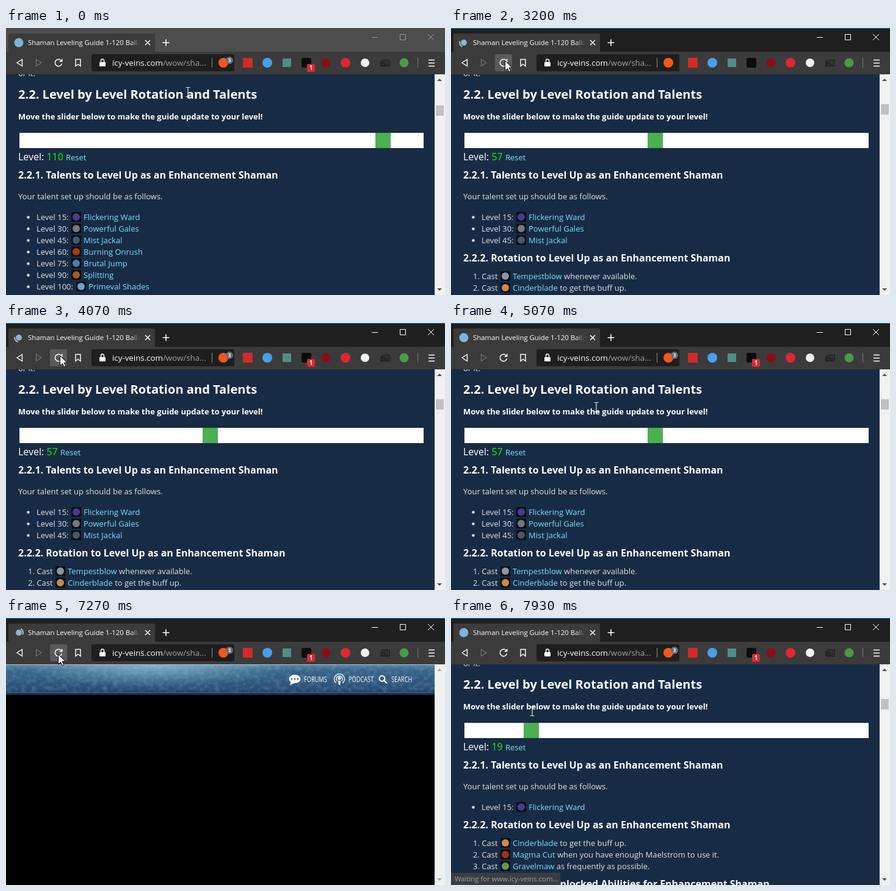
Animation, 719 px wide and 438 px high, one loop 8000 ms. Source, as an HTML page:

```html
<!DOCTYPE html>
<html lang="en">
<head>
<meta charset="utf-8">
<title>Leveling guide</title>
<style>
html, body { margin: 0; width: 100%; height: 100%; overflow: hidden; background: #182b44; }
svg { display: block; width: 719px; height: 438px; }
text { font-family: "Open Sans", "Noto Sans", sans-serif; fill: #e0e3e7; }
.bold { font-weight: 700; }
.white { fill: #fff; }
.link { fill: #76e2ff; }
.lime { fill: #0f0; }
.title { fill: #fff; font-weight: 700; stroke: #fff; stroke-width: .8px; }
.news { fill: #d3281f; font-weight: 700; }
.grey { fill: #a2a2a2; }
</style>
</head>
<body>
<svg id="stage" viewBox="0 0 719 438">
  <defs>
    <linearGradient id="sky" x2="0" y2="1">
      <stop offset="0" stop-color="#5886a6"/><stop offset=".2" stop-color="#38658a"/>
      <stop offset=".8" stop-color="#2a4f77"/><stop offset="1" stop-color="#1c3557"/>
    </linearGradient>
    <radialGradient id="glow"><stop offset="0" stop-color="#8fc0d6" stop-opacity=".75"/><stop offset="1" stop-color="#8fc0d6" stop-opacity="0"/></radialGradient>
    <linearGradient id="fade"><stop offset="0" stop-color="#3b3b3b" stop-opacity="0"/><stop offset="1" stop-color="#3b3b3b"/></linearGradient>
    <filter id="grain" x="0" y="0" width="1" height="1">
      <feTurbulence type="fractalNoise" baseFrequency=".12 .16" numOctaves="4" seed="4"/>
      <feColorMatrix values="0 0 0 0 .5  0 0 0 0 .7  0 0 0 0 .82  2 0 0 0 -.8"/>
    </filter>
    <clipPath id="view"><path d="M0 76H719V438H0z"/></clipPath>
  </defs>
  <g id="page" clip-path="url(#view)"></g>
  <g id="chrome"></g>
  <g id="cursor"></g>
</svg>
<script>
const LOOP = 8000, FPS = 15;
const CONDENSED = .7;

const text = (x, y, size, s, cls = '') => `<text x="${x}" y="${y}" font-size="${size}" class="${cls}">${s}</text>`;
const narrow = (x, y, size, s, cls) =>
  `<text transform="translate(${x} ${y}) scale(${CONDENSED} 1)" font-size="${size}" class="${cls}">${s}</text>`;
const span = (s, cls, size = '') => `<tspan class="${cls}"${size && ` font-size="${size}"`}>${s}</tspan>`;
const link = (s, size) => span(s, 'link', size);
const rect = (x, y, w, h, fill, rx = 0) => `<rect x="${x}" y="${y}" width="${w}" height="${h}" fill="${fill}" rx="${rx}"/>`;
const disc = (x, y, r, fill) => `<circle cx="${x}" cy="${y}" r="${r}" fill="${fill}"/>`;
const line = (d, color = '#fff', w = 1) => `<path d="${d}" fill="none" stroke="${color}" stroke-width="${w}"/>`;
const fill = (d, color) => `<path d="${d}" fill="${color}"/>`;

const TALENTS = [
  [15, 'Flickering Ward', '#4a3a8f'], [30, 'Powerful Gales', '#737783'],
  [45, 'Mist Jackal', '#46586c'], [60, 'Burning Onrush', '#a33c12'],
  [75, 'Brutal Jump', '#4a7db0'], [90, 'Splitting', '#b0561a'],
  [100, 'Primeval Shades', '#6f9fca']
];
const CASTS = [
  [20, 'Tempestblow', '#8796a8', 'whenever available.'],
  [1, 'Cinderblade', '#c98a50', 'to get the buff up.'],
  [1, 'Magma Cut', '#9f3316', 'when you have enough Maelstrom to use it.'],
  [1, 'Gravelmaw', '#5f9a50', 'as frequently as possible.']
];
const THUMB_Y = { 110: 127, 57: 125, 84: 126, 19: 133 };

const icon = (x, y, color) => rect(x, y - 13, 16, 16, '#0c0f14') + disc(x + 8, y - 5, 6, color);
const thumbX = level => Math.round(322 + (level - 57) * 5.345);

function scrollbar(y, h, arrows = '#505050') {
  return rect(702, 76, 17, 362, '#f1f1f1') + (h ? rect(704, y, 13, h, '#c1c1c1') : '') +
    fill('M706 87h8l-4-4zM706 427h8l-4 4z', arrows);
}

function guide(level) {
  let out = rect(0, 76, 702, 362, '#182b44') +
    text(20, 79, 13, 'or it.') +
    text(20, 116, 20.1, '2.2. Level by Level Rotation and Talents', 'bold white') +
    text(20, 150, 13, 'Move the slider below to make the guide update to your level!', 'bold white') +
    rect(22, 172, 662, 25, '#fff') + rect(thumbX(level), 172, 25, 25, '#4caf50') +
    text(20, 217, 16, `Level: ${span(level, 'lime')} ${link('Reset', 13)}`, 'white') +
    text(20, 247, 16, '2.2.1. Talents to Level Up as an Enhancement Shaman', 'bold white') +
    text(20, 281, 13, 'Your talent set up should be as follows.');
  let y = 315;
  for (const [min, name, color] of TALENTS.filter(row => row[0] <= level)) {
    const x = min < 100 ? 107 : 115;
    out += disc(36.5, y - 4.5, 2.3, '#e0e3e7') + text(50, y, 13, `Level ${min}:`) +
      icon(x, y, color) + text(x + 20, y, 13, name, 'link');
    y += 19;
  }
  y += 11;
  out += text(20, y, 16, '2.2.2. Rotation to Level Up as an Enhancement Shaman', 'bold white');
  y += 29;
  CASTS.filter(row => row[0] <= level).forEach(([, name, color, rest], i) => {
    out += text(36, y, 13, `${i + 1}. Cast`) + icon(81, y, color) + text(101, y, 13, `${link(name)} ${rest}`);
    y += 19;
  });
  return out + text(20, y + 11, 16, '2.2.3. Summary of Unlocked Abilities for Enhancement Shaman', 'bold white') +
    scrollbar(THUMB_Y[level], 17);
}

function header() {
  return rect(0, 76, 702, 50, 'url(#sky)') + '<ellipse cx="240" cy="78" rx="220" ry="36" fill="url(#glow)"/>' +
    '<rect y="77" width="702" height="46" filter="url(#grain)" opacity=".22"/>' +
    rect(0, 76, 702, 1, '#a9c6d6') + rect(0, 122, 702, 1, '#3f658b') + rect(0, 123, 702, 3, '#1b3150') +
    '<ellipse cx="473" cy="100" rx="9.5" ry="7" fill="#fff"/>' + fill('M467 104l-2 6 7-3z', '#fff') +
    [468, 473, 478].map(x => disc(x, 100, 1.3, '#2b5078')).join('') +
    narrow(488, 105, 13.2, 'FORUMS', 'white') +
    disc(546, 99, 2.5, '#fff') + fill('M544 103h4l-1 7h-2z', '#fff') +
    line('M542.5 103.5a5 5 0 1 1 7 0M541 107a8.5 8.5 0 1 1 10 0', '#fff', 1.4) +
    narrow(561, 105, 13.2, 'PODCAST', 'white') +
    line('M619 102.5a4.5 4.5 0 1 1 .1-.1l5 5', '#fff', 2) +
    narrow(631, 105, 13.2, 'SEARCH', 'white');
}

function blankPage() {
  return rect(0, 76, 702, 362, '#000') + header() + scrollbar(0, 0, '#a3a3a3');
}

function contents() {
  const items = ['General Ballad of Eldrenth Leveling Tips', 'Leveling 1-120 as an Enhancement Shaman', 'Leveling 1-120 as an Elemental Shaman'];
  return items.map((s, i) => {
    const y = 378 + 26 * i;
    const expand = `<circle cx="31.5" cy="${y - 5.5}" r="7.5" fill="none" stroke="#fff" stroke-width="1.2"/>` +
      line(`M28.5 ${y - 5.5}h6m-3-3v6`, '#76e2ff');
    return text(45, y, 13, `${i + 1}. ${s}`, 'link') + (i ? expand : '');
  }).join('');
}

function topPage() {
  return rect(0, 76, 702, 362, '#182b44') + header() +
    text(9, 107, 19, 'OAK THORN', 'bold white') + narrow(185, 109, 13.5, 'NEWS &amp; GUIDES', 'news') +
    fill('M670 96h16v2h-16zM670 100h16v2h-16zM670 104h16v2h-16z', '#fff') +
    narrow(20, 201, 36, 'Shaman Leveling Guide 1-120 Ballad of Eldrenth', 'title') +
    narrow(20, 244, 36, '(BoE) 8.2', 'title') +
    text(20, 286, 13, `Last updated on ${link('Jan 12, 2020')} at ${link('17:00')} by ${link('Gombard')},${link('Drameth')}, and ${link('Quillaron')}`) +
    text(20, 304, 13, '9 comments', 'link') +
    text(20, 350, 24, 'Table of Contents', 'bold white') +
    contents() + scrollbar(93, 123, '#7a7a7a');
}

function browser({ active, hover, loading, badges, status, spin }) {
  const ctl = active ? '#fff' : '#9b9b9b';
  return rect(0, 0, 719, 39, active ? '#1f1f1f' : '#4d4d4d') + (active ? rect(0, 0, 719, 1, '#0a74c9') : '') +
    rect(0, 39, 719, 37, '#3b3b3b') + rect(4, 9, 240, 31, '#3b3b3b', 2) +
    (loading
      ? disc(21, 24, 5, '#8fb4d0') + `<g transform="rotate(${spin} 21 24)">${line('M21 17a7 7 0 0 1 7 7', '#b9b9b9', 2)}</g>`
      : disc(21, 24, 7.5, '#7fb3d8')) +
    text(36, 28, 11.4, 'Shaman Leveling Guide 1-120 Balla', 'white') +
    rect(204, 12, 15, 24, 'url(#fade)') + rect(219, 12, 20, 24, '#3b3b3b') +
    line('M228 20l8 8m0-8l-8 8', '#fff', 1.5) + line('M256.5 24h11m-5.5-5.5v11', '#fff', 1.6) +
    line('M599 15.5h10M645.5 10.5h9v9h-9zM691 10l10 10m0-10l-10 10', ctl) +
    line('M26.5 51.5v11l-8.5-5.5z', '#fff', 1.4) + line('M49.5 51.5v11l8.5-5.5z', '#777', 1.2) +
    (hover ? rect(72, 43, 28, 28, '#5a5a5a', 3) : '') +
    line('M91.5 58.5a5.7 5.7 0 1 1-2-6', '#fff', 1.5) + fill('M92.5 50v5.5h-5.5z', '#fff') +
    line('M114 51.5h8v11l-4-3.2-4 3.2z', '#fff', 1.4) +
    rect(140, 43, 234, 28, '#1e1e1e', 3) + rect(153, 56, 10, 7, '#fff', 1) + line('M155.5 56v-2.5a2.5 2.5 0 0 1 5 0v2.5', '#fff', 1.5) +
    text(174, 62, 13.3, 'icy-veins.com' + span('/wow/sha...', 'grey'), 'white') +
    rect(337, 49, 1, 16, '#8a8a8a') + disc(356, 57, 8, '#f3561f') +
    (badges ? disc(366, 53, 6, '#676d78') + text(363.8, 56, 8, '3', 'bold white') : '') +
    rect(388, 49, 16, 16, '#d32a2a') + disc(428, 57, 8, '#4a9fe8') + rect(453, 50, 14, 14, '#4f8f88') +
    rect(484, 49, 16, 16, '#0b0b0b', 3) +
    (badges ? rect(493, 59, 13, 13, '#e3252f', 2) + text(496.8, 69, 10, '1', 'bold white') : '') +
    disc(524, 57, 7.5, '#8a0d16') + disc(556, 57, 8, '#dd2832') + disc(588, 57, 7, '#f0f0f0') +
    line('M616 52.5h12v10h-14v-8h2v8M618 55.5h3v3h-3zM623 55.5h3M623 58.5h3M618 60.5h8', '#111') +
    disc(652, 57, 7.5, '#4b9a45') + rect(674, 49, 1, 16, '#777') +
    line('M692 52.5h10M692 57.5h10M692 62.5h10', '#fff', 1.3) +
    (status ? rect(0, 418, 179, 20, '#3a3d42') + text(6, 432, 11.35, 'Waiting for www.icy-veins.com...', 'grey') : '');
}

// Pointer track: time, x, y
const TRACK = [
  [0, 298, 105], [270, 360, 62], [530, 150, 58], [730, 52, 190], [870, 70, 226], [1070, 72, 224], [1330, 450, 168],
  [1530, 467, 178], [1730, 412, 185], [1867, 333, 188], [2400, 333, 188], [3070, 88, 53], [4130, 88, 53], [4530, 68, 226],
  [4800, 76, 227], [5000, 166, 138], [5067, 238, 138], [5333, 479, 184], [5600, 479, 184], [5933, 131, 186],
  [6400, 131, 186], [6930, 85, 59], [7400, 85, 59], [7930, 133, 153], [8001, 133, 153]
];
function pointerAt(t) {
  const i = TRACK.findIndex(k => k[0] > t), [t0, x0, y0] = TRACK[i - 1], [t1, x1, y1] = TRACK[i];
  const k = (t - t0) / (t1 - t0);
  return [x0 + (x1 - x0) * k, y0 + (y1 - y0) * k];
}

const SHAPES = {
  arrow: '<path d="M.5 .5v16.500l4-3.700 2.600 5.700 2.600-1.200-2.600-5.600h5z" fill="#fff" stroke="#000"/>',
  hand: '<path d="M-1.500 1.500q0-2 1.700-2t1.800 2v6q3-1 3.500 .7 3-.8 3.500 1 2.800-.4 2.800 2v4q0 3-2 6.300h-8.500q-2-4-5.800-8 .5-3 4-.5z" fill="#fff" stroke="#000"/>',
  beam: '<path d="M-3.500-7.500h3l.5 .5 .5-.5h3M0-7V7M-3.500 7.500h3l.5-.5 .5 .5h3" fill="none" stroke="#e9e4dc" stroke-width="1.2"/>'
};
function shapeAt(x, y, page, level) {
  if (y < 76 || page !== 'guide') return 'arrow';
  const inside = (left, top, right, bottom) => x >= left && x < right && y >= top && y < bottom;
  if (inside(thumbX(level), 172, thumbX(level) + 25, 197) || inside(97, 204, 131, 220)) return 'hand';
  return inside(20, 95, 411, 122) || inside(20, 132, 422, 158) || inside(20, 203, 97, 222) || inside(20, 232, 447, 252)
    ? 'beam' : 'arrow';
}

const between = (t, a, b) => t >= a && t < b;
const levelAt = t => t < 2120 ? 110 : t < 5520 ? 57 : t < 6060 ? 84 : 19;
const pageAt = t =>
  between(t, 3320, 3390) || between(t, 7190, 7320) ? 'blank' :
  between(t, 3390, 3590) || between(t, 7320, 7460) ? 'top' : 'guide';

const shown = {};
function put(id, html) {
  if (shown[id] !== html) document.getElementById(id).innerHTML = shown[id] = html;
}

function draw(now) {
  const t = Math.floor(now % LOOP / 1000 * FPS + .06) * 1000 / FPS;
  const page = pageAt(t), level = levelAt(t), [x, y] = pointerAt(t);
  put('page', page === 'guide' ? guide(level) : page === 'top' ? topPage() : blankPage());
  put('chrome', browser({
    active: t >= 2060,
    hover: between(x, 72, 100) && between(y, 43, 71),
    loading: between(t, 3190, 4600) || between(t, 7060, 7860),
    badges: !between(t, 3190, 3390) && !between(t, 7060, 7190),
    status: between(t, 3590, 4000) || t >= 7590,
    spin: Math.round(t * .4)
  }));
  put('cursor', `<g transform="translate(${Math.round(x)} ${Math.round(y)})">${SHAPES[shapeAt(x, y, page, level)]}</g>`);
}

const start = performance.now();
function frame() {
  draw(performance.now() - start);
  requestAnimationFrame(frame);
}
frame();
</script>
</body>
</html>
```
